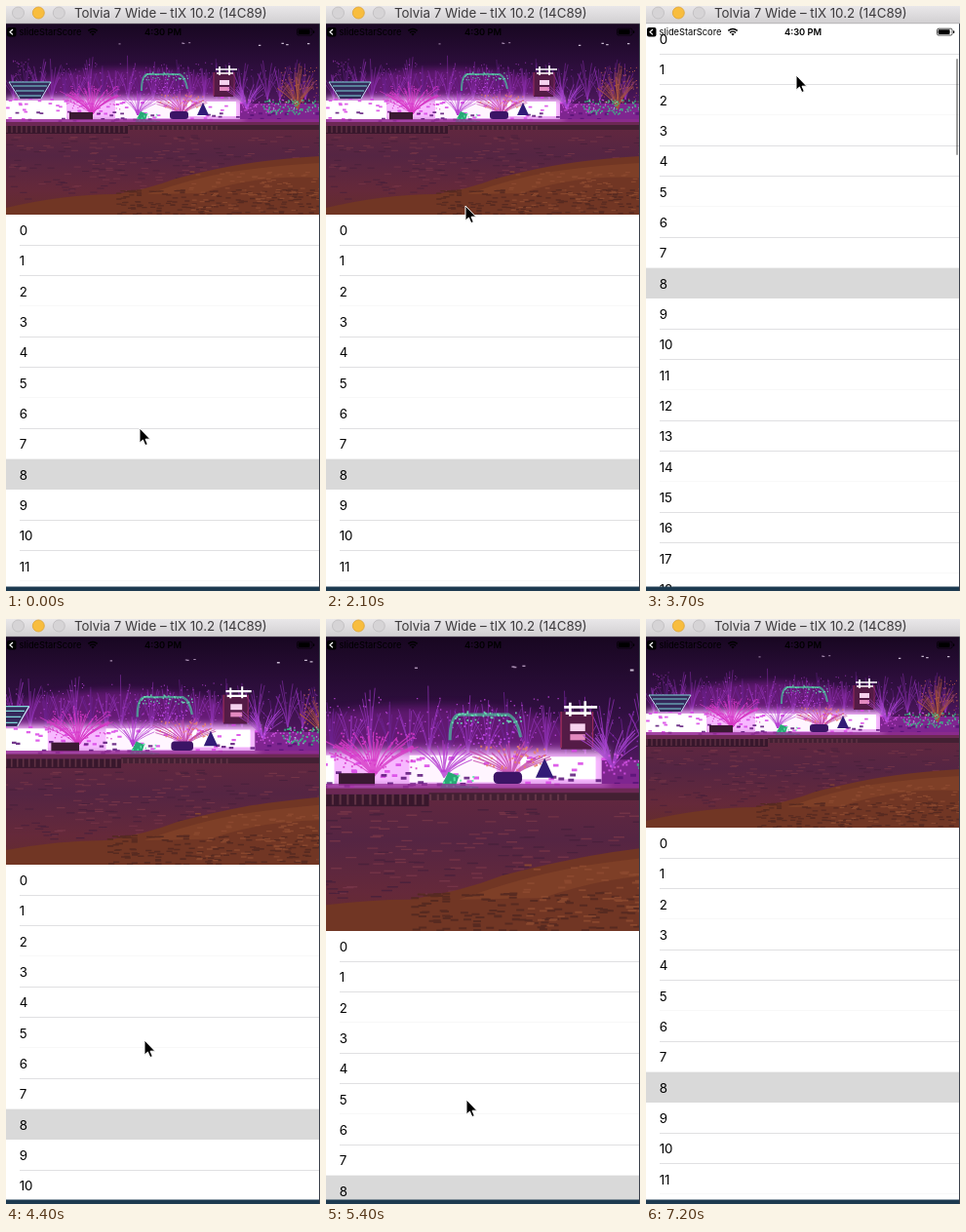
Write an HTML page that moves like this. It is 322 px wide and 600 px high and loops after 7.3 s.

```html
<!DOCTYPE html>
<html lang="en">
<head>
<meta charset="utf-8">
<title>Stretchy header</title>
<style>
  html, body { margin: 0; width: 100%; height: 100%; overflow: hidden; background: #fff; }
  svg { display: block; width: 322px; height: 600px; font-family: Inter, Roboto, sans-serif; }
</style>
</head>
<body>
<svg viewBox="0 0 322 600">
  <defs>
    <linearGradient id="sky" x2="0" y2="1">
      <stop offset="0" stop-color="#180721"/>
      <stop offset=".45" stop-color="#300f40"/>
      <stop offset="1" stop-color="#6a1f78"/>
    </linearGradient>
    <linearGradient id="ground" x2="0" y2="1">
      <stop offset="0" stop-color="#61273f"/>
      <stop offset=".3" stop-color="#552543"/>
      <stop offset=".7" stop-color="#65293a"/>
      <stop offset="1" stop-color="#642d2b"/>
    </linearGradient>
    <linearGradient id="bar" x2="0" y2="1">
      <stop offset="0" stop-color="#e9e7e9"/>
      <stop offset="1" stop-color="#d1cfd1"/>
    </linearGradient>
    <filter id="soft" x="-20%" y="-60%" width="140%" height="220%"><feGaussianBlur stdDeviation="3"/></filter>
    <clipPath id="screen"><rect y="18" width="322" height="578"/></clipPath>
  </defs>
  <g clip-path="url(#screen)">
    <g id="photo"></g>
    <g id="list">
      <rect width="322" height="900" fill="#fff"/>
      <g id="rows"></g>
    </g>
    <rect id="indicator" x="318" width="2" rx="1" fill="#000" fill-opacity=".38"/>
    <g id="status" fill="#000">
      <rect x="1" y="22" width="9.5" height="9.5" rx="2"/>
      <path d="M7 24 L4 26.7 L7 29.4" fill="none" stroke="#fff" stroke-width="1.2"/>
      <text x="13.5" y="30" font-size="9.3">slideStarScore</text>
      <g fill="none" stroke="#000" stroke-width="1.4">
        <path d="M84.3 25.4 Q89 21.4 93.7 25.4 M86 27.4 Q89 24.9 92 27.4"/>
      </g>
      <path d="M87.3 28.6 Q89 27.4 90.7 28.6 L89 30.4 Z"/>
      <text x="142" y="30" font-size="9.3" font-weight="600">4:30 PM</text>
      <rect x="298.5" y="23.2" width="15.5" height="6.8" rx="1.5" fill="none" stroke="#000" stroke-width=".7"/>
      <rect x="299.6" y="24.3" width="12" height="4.6" rx=".8"/>
      <rect x="315" y="25.3" width="1.3" height="2.6" rx=".6"/>
    </g>
  </g>
  <rect y="595.5" width="322" height="5" fill="#1d3a50"/>
  <rect x="321" y="18" width="1" height="582" fill="#3a3f4a"/>
  <rect width="322" height="18" fill="url(#bar)"/>
  <rect y="17.4" width="322" height=".8" fill="#b0aeb0"/>
  <g stroke-width=".8">
    <circle cx="12.5" cy="7" r="6" fill="#d6d4d6" stroke="#bebcbe"/>
    <circle cx="33.3" cy="7" r="6" fill="#f8bd3e" stroke="#dca437"/>
    <circle cx="54.3" cy="7" r="6" fill="#d6d4d6" stroke="#bebcbe"/>
  </g>
  <text x="70" y="12" font-size="13.3" fill="#3c3a3c">Tolvia 7 Wide – tlX 10.2 (14C89)</text>
  <path id="cursor" d="M0 0 V15.2 L3.4 12 L5.8 17.6 L8.3 16.5 L6 11.2 H10.8 Z" fill="#000" stroke="#fff" stroke-width="1"/>
</svg>
<script>
const LOOP = 7300, STEP = 100, TOP = 18, REST = 214, ROW = 31.33, ROWS = 20;
const $ = id => document.getElementById(id);

let seed = 11;
const rnd = () => (seed = (seed * 16807) % 2147483647) / 2147483647;
const between = (a, b) => a + (b - a) * rnd();
const n1 = v => v.toFixed(1);

function add(parent, tag, attrs, text) {
  const el = document.createElementNS('http://www.w3.org/2000/svg', tag);
  for (const key in attrs) el.setAttribute(key, attrs[key]);
  if (text !== undefined) el.textContent = text;
  parent.appendChild(el);
  return el;
}

const photo = $('photo');
const rect = (x, y, width, height, fill, more) => add(photo, 'rect', { x, y, width, height, fill, ...more });
const shape = (d, fill, more) => add(photo, 'path', { d, fill, ...more });
const line = (d, stroke, width, opacity = 1) =>
  shape(d, 'none', { stroke, 'stroke-width': width, opacity });

function specks(count, x0, y0, x1, y1, color, size = 1.1, stretch = 1) {
  let d = '';
  for (let i = 0; i < count; i++)
    d += `M${n1(between(x0, x1))} ${n1(between(y0, y1))}h${n1(size * stretch)}`;
  line(d, color, size, .85);
}

// Branches fan out from one foot point.
function tree(x, foot, height, spread, color, count = 14, width = .7) {
  let d = '';
  for (let i = 0; i < count; i++) {
    const lean = between(-1, 1) * spread;
    const top = foot - height * between(.55, 1) * (1 - .3 * Math.abs(lean / spread));
    d += `M${x} ${foot}Q${n1(x + lean * .2)} ${n1((foot + top) / 2)} ${n1(x + lean)} ${n1(top)}`;
  }
  line(d, color, width, .8);
}

function drawPhoto() {
  rect(0, 18, 322, 112, 'url(#sky)');
  rect(0, 126, 322, 90, 'url(#ground)');
  add(photo, 'ellipse', { cx: 125, cy: 86, rx: 100, ry: 22, fill: '#8b209c', opacity: .5, filter: 'url(#soft)' });

  for (let x = 8; x < 310; x += 13)
    tree(x, 96, between(34, 50), 11, x % 3 ? '#8f32b4' : '#6d2390', 9, .6);
  specks(150, 50, 58, 215, 94, '#b944d8', .9);
  specks(70, 215, 65, 322, 96, '#8d32b5', .9);
  specks(35, 5, 54, 38, 78, '#a63bc0', .9);

  rect(0, 94, 244, 25, '#f7b8ff', { filter: 'url(#soft)' });
  rect(0, 97, 62, 19, '#fff');
  rect(112, 97, 58, 18, '#fff5ff');
  rect(186, 98, 50, 15, '#fff');
  rect(240, 100, 82, 16, '#7f2590');
  specks(60, 0, 94, 240, 118, '#d945e5', 1.8, 2);
  specks(45, 0, 108, 322, 119, '#5a1478', 1.9, 2);

  shape('M3 78H46L36 95H14Z', '#35285a');
  line('M3 78H46M7 82H42M10 87H39M13 92H36', '#7fd8d8', 1.1);
  line('M3 78L14 95M46 78L36 95', '#d2f1ff', .9);

  tree(88, 112, 36, 34, '#d63ac5', 38, .8);
  specks(90, 60, 82, 116, 106, '#d838c9', 1.2);
  tree(180, 112, 28, 28, '#c247a8', 28, .8);
  specks(45, 158, 91, 202, 107, '#e88068', 1.3);
  tree(135, 112, 28, 20, '#b43bd0', 18);

  line('M139 87Q139 71 145 70H178Q184 73 186 85', '#48cf9f', 2, .65);
  specks(45, 139, 68, 186, 76, '#6df0bc', 1.1);
  specks(35, 145, 75, 181, 91, '#c64bf0', 1.1);

  rect(213, 68, 20, 25, '#541b46');
  line('M215 65H237M216 69H233M219 62V71M229 61V71', '#fff', 1.7);
  rect(219, 76, 10, 5, '#f6d2ee');
  rect(219, 83, 10, 4, '#e38abf');
  line('M213 92V68M234 92V68', '#972b58', 1);

  tree(299, 106, 48, 21, '#a8553d', 30, .7);
  specks(75, 281, 62, 319, 99, '#c5614c', 1);
  tree(247, 106, 35, 22, '#a945d2', 22);
  specks(55, 240, 96, 286, 110, '#d855e8', 1.3);
  specks(70, 263, 96, 322, 111, '#39bd84', 1.6);
  specks(22, 263, 96, 322, 111, '#91f2cf', 1.1);

  shape('M131 122L138 108L145 111L143 117L158 118V122Z', '#28a875');
  specks(16, 134, 110, 154, 121, '#5bf0a6', 1.3);
  rect(65, 109, 24, 8, '#3a1932');
  rect(168, 108, 19, 8, '#3b1465', { rx: 3 });
  shape('M196 112L202 99L208 112Z', '#321b77');

  rect(0, 116, 322, 4, '#9a3098', { opacity: .75 });
  rect(0, 119, 322, 4, '#6c2854');
  rect(0, 123, 125, 8, '#38172c');
  rect(125, 122, 197, 5, '#432033');
  let posts = '';
  for (let x = 1; x < 220; x += 5) posts += `M${x} 123v${x < 125 ? 7 : 4}`;
  line(posts, '#744050', 1.4, .65);

  specks(130, 0, 133, 322, 190, '#773548', .9, 8);
  specks(120, 0, 133, 322, 205, '#48203b', .9, 8);
  shape('M0 207Q60 193 112 193Q146 188 174 177Q205 169 232 164Q272 157 322 154V216H0Z', '#713624');
  shape('M145 193Q193 176 232 170Q280 163 322 161V176Q254 173 201 192Z', '#834329', { opacity: .7 });
  specks(180, 110, 188, 322, 214, '#532820', 1.3, 4);
  specks(110, 185, 170, 322, 211, '#8d4a30', 1.2, 4);

  specks(4, 258, 38, 312, 41, '#e6d7ed', 1.2, 2);
  specks(4, 100, 37, 190, 39, '#bda2c5', 1, 2);
}

const separators = [];
function drawRows() {
  const rows = $('rows');
  for (let i = 0; i < ROWS; i++) {
    if (i === 8) add(rows, 'rect', { y: i * ROW, width: 322, height: ROW, fill: '#d9d9d9' });
    add(rows, 'text', { x: 13.7, y: i * ROW + 20.9, 'font-size': 13.3, fill: '#000' }, i);
    if (i !== 7 && i !== 8)
      separators.push({ y: (i + 1) * ROW, el: add(rows, 'rect', { x: 14, width: 308, height: 1 }) });
  }
}

// Each key is [time, ...values]; segments ease in and out.
const edgeKeys = [[0, REST], [2100, REST], [2800, 58.33], [3200, 6], [3600, 6], [3700, 18],
  [4400, 252], [4800, 298], [5400, 320], [5600, 322], [6200, REST], [LOOP, REST]];
const cursorKeys = [[0, 137, 433], [2000, 143, 205], [2100, 143, 205], [2800, 154, 38], [3200, 154, 38],
  [3500, 154, 55], [3600, 154, 55], [3700, 154, 71], [4400, 142, 432], [5400, 144, 493],
  [6200, 144, 496], [7100, 146, 610], [LOOP, 146, 610]];
const fadeKeys = [[0, 0], [2100, 0], [2200, 1], [3000, 1], [3200, 0], [3600, 0], [3700, 1], [5900, 1], [6300, 0], [LOOP, 0]];

function at(keys, t) {
  const i = keys.findIndex(key => key[0] > t);
  const a = keys[i - 1], b = keys[i];
  const p = (t - a[0]) / (b[0] - a[0]);
  const e = (1 - Math.cos(Math.PI * p)) / 2;
  return a.slice(1).map((v, j) => v + (b[j + 1] - v) * e);
}

function render(time) {
  const t = Math.floor((time % LOOP) / STEP) * STEP;
  const [edge] = at(edgeKeys, t);
  const [x, y] = at(cursorKeys, t);
  const zoom = Math.max(1, (edge - TOP) / (REST - TOP));
  photo.setAttribute('transform', `translate(161 ${TOP}) scale(${zoom}) translate(-161 ${-TOP})`);
  $('list').setAttribute('transform', `translate(0 ${edge})`);

  // Hairlines snap to whole pixels and fade when they fall on a boundary.
  for (const { y: offset, el } of separators) {
    const pos = edge + offset;
    const faint = Math.abs(pos - Math.round(pos)) < .17;
    el.setAttribute('y', Math.floor(pos) - edge);
    el.setAttribute('fill', faint ? '#f8f8f8' : '#e0e0e2');
  }

  const end = 153 - (edge - TOP) * .155;
  const start = Math.max(edge, end - 99);
  const bar = $('indicator');
  bar.setAttribute('y', start);
  bar.setAttribute('height', Math.max(0, end - start));
  bar.setAttribute('opacity', at(fadeKeys, t)[0]);
  $('cursor').setAttribute('transform', `translate(${x} ${y})`);
}

drawPhoto();
drawRows();
const began = performance.now();
function tick() {
  render(performance.now() - began);
  requestAnimationFrame(tick);
}
tick();
</script>
</body>
</html>
```
